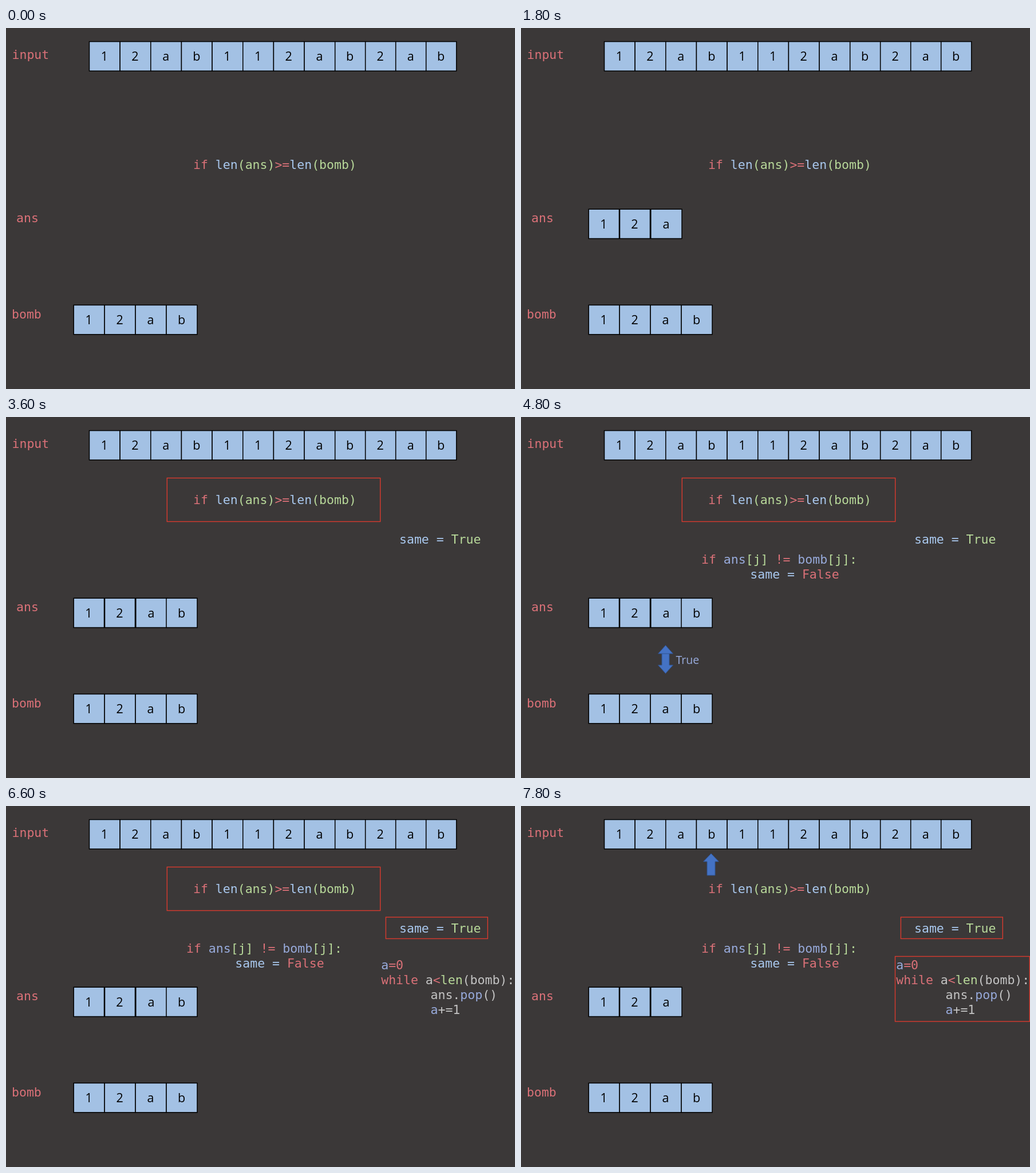
An HTML page that plays this animation: 889 px wide and 630 px high, repeating every 8000 ms.

```html
<!DOCTYPE html>
<html>
<head>
<meta charset="utf-8">
<style>
  html, body { margin: 0; width: 100%; height: 100%; overflow: hidden; background: #3b3838; }
  svg { display: block; }
  text { white-space: pre; }
  .code { font: 21.5px "DejaVu Sans Mono", monospace; }
  .cell { fill: #a3c1e4; stroke: #000; stroke-width: 1.5; }
  .letter { font: 21.5px "Open Sans", "Noto Sans", sans-serif; text-anchor: middle; }
  .note { font: 19.5px "Open Sans", "Noto Sans", sans-serif; fill: #98abdc; }
  .frame { fill: none; stroke: #d83a2e; stroke-width: 1.4; }
  .arrow { fill: #4472c4; stroke: #2f528f; stroke-width: 1; }
</style>
</head>
<body>
<svg id="stage" width="889" height="630" viewBox="0 0 889 630"></svg>
<script>
const STEP = 600, LOOP = 8000, END = 99;
const colors = { r: '#db7178', b: '#a9c8ee', g: '#b8d99a', v: '#98abdc', w: '#c4c4c4' };
const escapeText = s => s.replace(/&/g, '&amp;').replace(/</g, '&lt;').replace(/>/g, '&gt;');

// Each part is a colour key followed by its text.
const code = (x, y, ...parts) => `<text class="code" x="${x}" y="${y}">` + parts.map(p =>
  `<tspan fill="${colors[p[0]]}">${escapeText(p.slice(1))}</tspan>`).join('') + '</text>';

const cell = (left, right, top, letter) =>
  `<rect class="cell" x="${left}" y="${top}" width="${right - left}" height="51.3"/>` +
  `<text class="letter" x="${(left + right) / 2 - 0.5}" y="${top + 33.5}">${letter}</text>`;

const row = (left, top, letters, pitch) => [...letters].map((c, i) =>
  cell(left + i * pitch, left + (i + 1) * pitch, top, c)).join('');

const frame = (x, y, right, bottom) =>
  `<rect class="frame" x="${x}" y="${y}" width="${right - x}" height="${bottom - y}"/>`;

const compare = (x, y) =>
  `<path class="arrow" d="M${x} ${y}l13 14.5h-6.5v20h6.5l-13 14.5l-13 -14.5h6.5v-20h-6.5z m-6.5 14.5h13"/>` +
  `<text class="note" x="${x + 18}" y="${y + 32.3}">True</text>`;

const condition = y => code(327, y, 'rif ', 'blen', 'g(ans)', 'r>=', 'blen', 'g(bomb)');

// [first step, step after the last, markup]
const scene = [
  [0, END, code(10.5, 54, 'rinput') + code(18, 338.7, 'rans') + code(10, 507.2, 'rbomb') +
    row(145.5, 23.7, '12ab112a', 53.65) + row(574.7, 23.7, 'b2ab', 53) +
    row(118.2, 483.5, '12ab', 53.95)],
  [1, END, cell(118.2, 171.5, 316.2, '1')],
  [2, END, cell(172.5, 225.5, 316.2, '2')],
  [3, END, cell(226.8, 281, 316.2, 'a')],
  [4, 13, cell(280, 334, 316.2, 'b')],
  [12, END, '<path class="arrow" d="M332 83l13.5 14h-6.5v24h-14v-24h-6.5z"/>'],
  [0, 6, condition(246.3)],
  [5, 6, frame(281.3, 201, 653.7, 277)],
  [6, END, condition(152) + code(687, 220.5, 'bsame = ', 'gTrue')],
  [6, 13, frame(281.3, 106.5, 653.7, 182.5)],
  [7, END, code(315, 255.5, 'rif ', 'vans', 'g[j] ', 'r!= ', 'vbomb', 'g[j]:') +
    code(400.3, 281.5, 'bsame = ', 'rFalse')],
  [7, 8, compare(306.5, 398.5)],
  [8, 9, compare(252.5, 398.5)],
  [9, 10, compare(198, 399.5)],
  [10, 11, compare(143, 400.7)],
  [11, END, frame(663.4, 194, 841.3, 231.5) +
    code(655.2, 285.2, 'va', 'r=0') +
    code(655.2, 311.2, 'rwhile ', 'wa', 'r<', 'glen', 'w(bomb):') +
    code(741.5, 337, 'wans.', 'vpop', 'w()') +
    code(741.5, 362.7, 'va', 'w+=1')],
  [12, END, frame(653.5, 262.5, 888.4, 376)],
];

const stage = document.getElementById('stage');
stage.innerHTML = scene.map(([, , markup]) => `<g>${markup}</g>`).join('');
const groups = [...stage.children];

function draw() {
  const step = Math.floor(performance.now() % LOOP / STEP);
  scene.forEach(([from, to], i) => {
    groups[i].style.display = step >= from && step < to ? '' : 'none';
  });
  requestAnimationFrame(draw);
}
draw();
</script>
</body>
</html>
```
